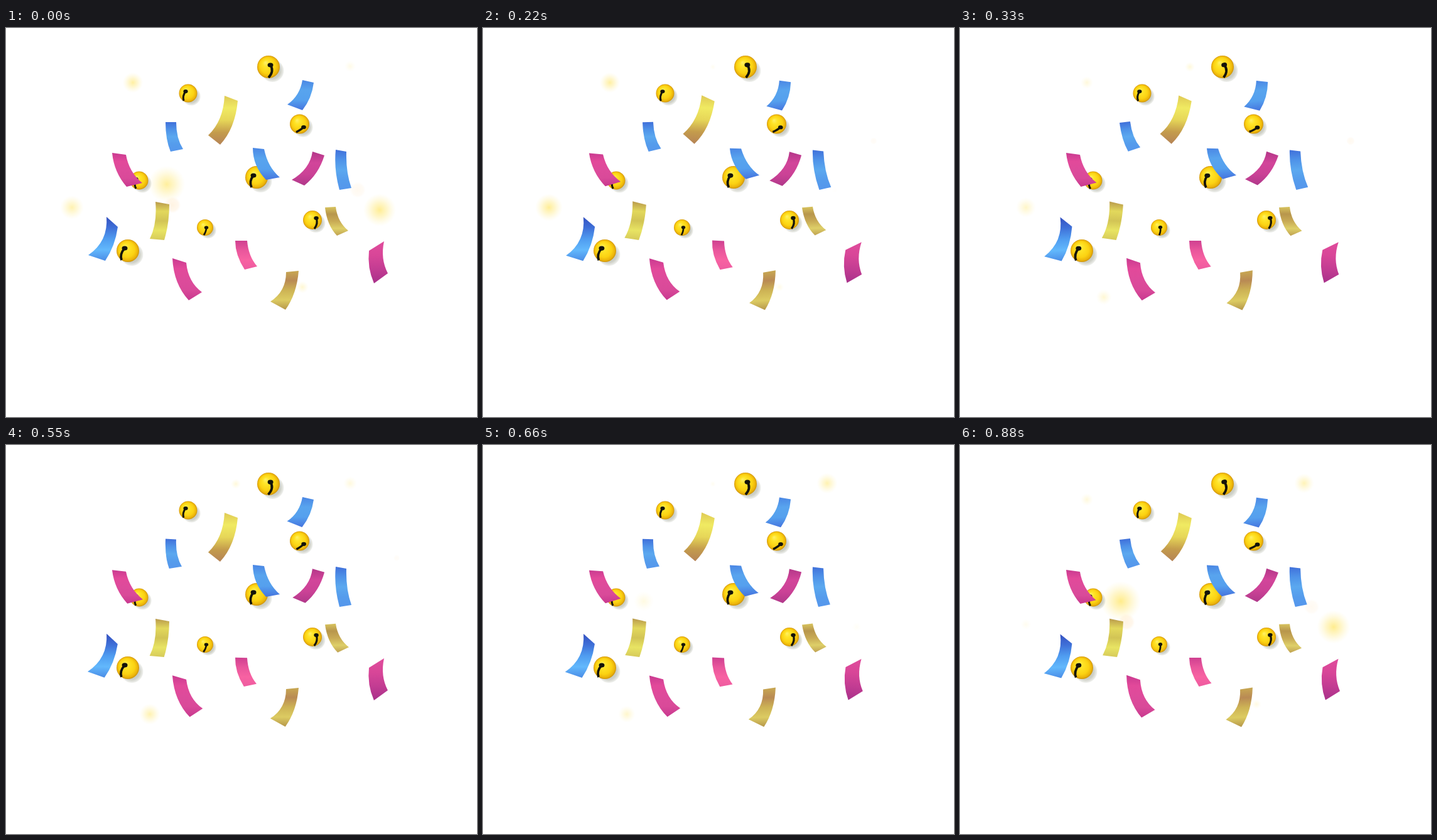
Animation, 750 px wide and 620 px high, one loop 0.99 s. Source, as an HTML page:

```html
<!DOCTYPE html>
<html lang="en">
<head>
<meta charset="utf-8">
<title>Confetti and bells</title>
<style>
  html, body { margin: 0; width: 100%; height: 100%; overflow: hidden; background: #fff; }
  svg { display: block; width: 100%; height: 100%; }
</style>
</head>
<body>
<svg id="stage" viewBox="0 0 750 620"><defs id="defs"></defs></svg>
<script>
const STEP_MS = 110, STEPS = 9;
const stage = document.getElementById('stage');
const defs = document.getElementById('defs');
const updates = []; // each takes the current step

function add(parent, tag, attrs) {
  const node = document.createElementNS('http://www.w3.org/2000/svg', tag);
  for (const name in attrs) node.setAttribute(name, attrs[name]);
  parent.append(node);
  return node;
}

function gradient(id, kind, attrs, stops) {
  const node = add(defs, kind + 'Gradient', { id, ...attrs });
  stops.forEach(([offset, color, opacity = 1]) =>
    add(node, 'stop', { offset, 'stop-color': color, 'stop-opacity': opacity }));
}

function ribbonPaint(id, ...colors) {
  gradient(id, 'linear', { x1: 0, y1: 0, x2: 0, y2: 1 },
    colors.map((color, i) => [i / (colors.length - 1), color]));
}

ribbonPaint('gold', '#dfca55', '#f0ea62', '#e6d658', '#c49c4c', '#b58356');
ribbonPaint('yellow', '#b99a4c', '#e2d85c', '#d2c455', '#e8e463', '#d6ca5a');
ribbonPaint('bronze', '#c8a852', '#b98a54', '#cdb355', '#dccb62', '#b5964a');
ribbonPaint('sand', '#d8c45e', '#b8964c', '#c8aa55', '#decf68', '#c0a252');
ribbonPaint('blue', '#4070da', '#4e92e8', '#5ba8ef', '#559cec', '#5596ec');
ribbonPaint('sky', '#4a86e4', '#58a4ee', '#55a0ee', '#4574de');
ribbonPaint('navy', '#3450c0', '#3f70d8', '#4f9cf0', '#62b8fc', '#4a8ce6');
ribbonPaint('pink', '#c93a90', '#e2499a', '#dd4b9b', '#d94a99', '#c8388f');
ribbonPaint('plum', '#b33688', '#d2459a', '#cb4296', '#b0388a');
ribbonPaint('rose', '#cf4090', '#e9569c', '#f762a2', '#ee5ba0');
ribbonPaint('berry', '#e04c9c', '#d84698', '#c23c92', '#a8308a');

gradient('brass', 'radial', { cx: .5, cy: .5, r: .5, fx: .36, fy: .3 }, [
  [0, '#fff068'], [.3, '#ffe428'], [.7, '#fbd212'], [.9, '#ecb40a'], [1, '#cc920a']]);
gradient('shade', 'radial', {}, [
  [0, '#5c6448', .45], [.7, '#5c6448', .3], [1, '#5c6448', .08]]);
gradient('light', 'radial', {}, [
  [0, '#ffe45c', .72], [.45, '#ffe878', .42], [1, '#fff0a8', 0]]);
gradient('peach', 'radial', {}, [
  [0, '#ffe6c0', .5], [.7, '#ffe8c8', .35], [1, '#fff0dc', 0]]);

// Two swings per loop; peak is the part of a swing at which the angle is largest.
const wave = (step, peak) => Math.cos(2 * Math.PI * (2 * step / STEPS - peak));

function sway(node, x, y, degrees, peak) {
  updates.push(step => {
    const angle = degrees * (wave(0, peak) - wave(step, peak));
    node.setAttribute('transform', `rotate(${angle} ${x} ${y})`);
  });
}

// Lights swell and fade once per loop.
function glow(x, y, radius, peak, strength = 1, paint = 'light') {
  const node = add(stage, 'circle', { cx: x, cy: y, fill: `url(#${paint})` });
  updates.push(step => {
    const phase = 2 * Math.PI * (step - peak) / STEPS;
    const level = Math.max(0, (Math.cos(phase) + .2) / 1.2);
    node.setAttribute('r', radius * Math.sqrt(level));
    node.setAttribute('opacity', strength * level);
  });
}

// The slit runs from its round hole to the rim, bulging sideways by bow.
function bell(x, y, r, holeX, holeY, endX, endY, bow, swing = 2) {
  add(stage, 'circle', { cx: x + r * .36, cy: y + r * .34, r, fill: 'url(#shade)' });
  add(stage, 'circle', { cx: x, cy: y, r, fill: 'url(#brass)' });
  const slit = add(stage, 'g', { fill: '#14140a', stroke: '#14140a' });
  const midX = (holeX + endX) / 2 + bow, midY = (holeY + endY) / 2;
  add(slit, 'ellipse', { cx: holeX, cy: holeY, rx: r * .25, ry: r * .2, stroke: 'none' });
  add(slit, 'path', {
    d: `M${holeX} ${holeY}Q${midX} ${midY} ${endX} ${endY}`,
    fill: 'none', 'stroke-width': r * .21
  });
  sway(slit, x, y, swing, .67);
}

function ribbon(paint, degrees, peak, d) {
  const node = add(stage, 'path', { d: d + 'Z', fill: `url(#${paint})` });
  const [x1, y1, x2, y2] = d.match(/\d+/g).map(Number);
  sway(node, (x1 + x2) / 2, (y1 + y2) / 2, degrees, peak);
}

glow(202, 87, 18, 1);
glow(256, 249, 32, 8.1);
glow(105, 286, 23, 1.3);
glow(595, 290, 27, 8.4);
glow(548, 61, 18, 6.9, .8);
glow(229, 429, 17, 4.6, .7);
glow(366, 62, 9, 4, .4);
glow(472, 413, 10, .4, .4);
glow(265, 282, 14, 8.4, 1, 'peach');
glow(560, 258, 13, 8.7, .5, 'peach');
glow(622, 180, 7, 3.4, .5, 'peach');

bell(418, 62, 18, 421, 59, 418, 79, 8, 4);
bell(290, 104, 14.5, 286, 101, 283, 116, -4);
bell(467.5, 153, 15.5, 474, 158, 462, 166, 2, -4);
bell(212, 243, 14.5, 207, 241, 207, 256, -4);
bell(399, 238, 18, 394, 235, 391, 254, -6);
bell(488, 306, 15, 494, 303, 491, 320, 5);
bell(317, 318, 13, 319, 318, 315, 330, 2, 7);
bell(194, 355, 18, 189, 351, 184, 370, -6);

ribbon('gold', 2, .05, 'M348 108L369 116Q365 160 341 186L322 171Q346 148 348 108');
ribbon('blue', 5.2, .69, 'M254 150L271 150Q271 176 282 193L262 197Q254 178 254 150');
ribbon('sky', 3.7, .6, 'M472 83L490 87Q487 112 472 131L448 122Q468 108 472 83');
ribbon('pink', 2, .36, 'M169 199L191 202Q196 230 217 247L192 253Q172 230 169 199');
ribbon('sky', 3, .55, 'M393 191L411 193Q417 222 436 238L414 242Q393 220 393 191');
ribbon('plum', 2.5, .28, 'M488 197L507 203Q498 233 475 251L455 242Q484 225 488 197');
ribbon('blue', 2.4, .55, 'M525 194L542 197Q541 230 550 255L531 258Q522 226 525 194');
ribbon('yellow', 2, .02, 'M238 277L260 281Q260 312 252 338L229 336Q241 312 238 277');
ribbon('navy', 2.4, .68, 'M160 301L178 317Q174 347 158 371L131 362Q163 340 160 301');
ribbon('pink', 2.1, .28, 'M265 367L287 374Q290 405 312 421L291 434Q267 408 265 367');
ribbon('rose', 2.2, .85, 'M365 339L384 339Q386 364 400 380L380 385Q365 362 365 339');
ribbon('bronze', 2.4, .58, 'M446 389L466 387Q463 424 445 449L421 436Q446 420 446 389');
ribbon('sand', 2.1, .3, 'M508 286L525 285Q528 309 545 323L527 331Q511 314 508 286');
ribbon('berry', 3.6, .05, 'M578 355L602 340Q596 368 608 391L586 407Q575 382 578 355');

function draw() {
  const step = Math.floor(performance.now() / STEP_MS) % STEPS;
  updates.forEach(update => update(step));
  requestAnimationFrame(draw);
}
draw();
</script>
</body>
</html>
```
